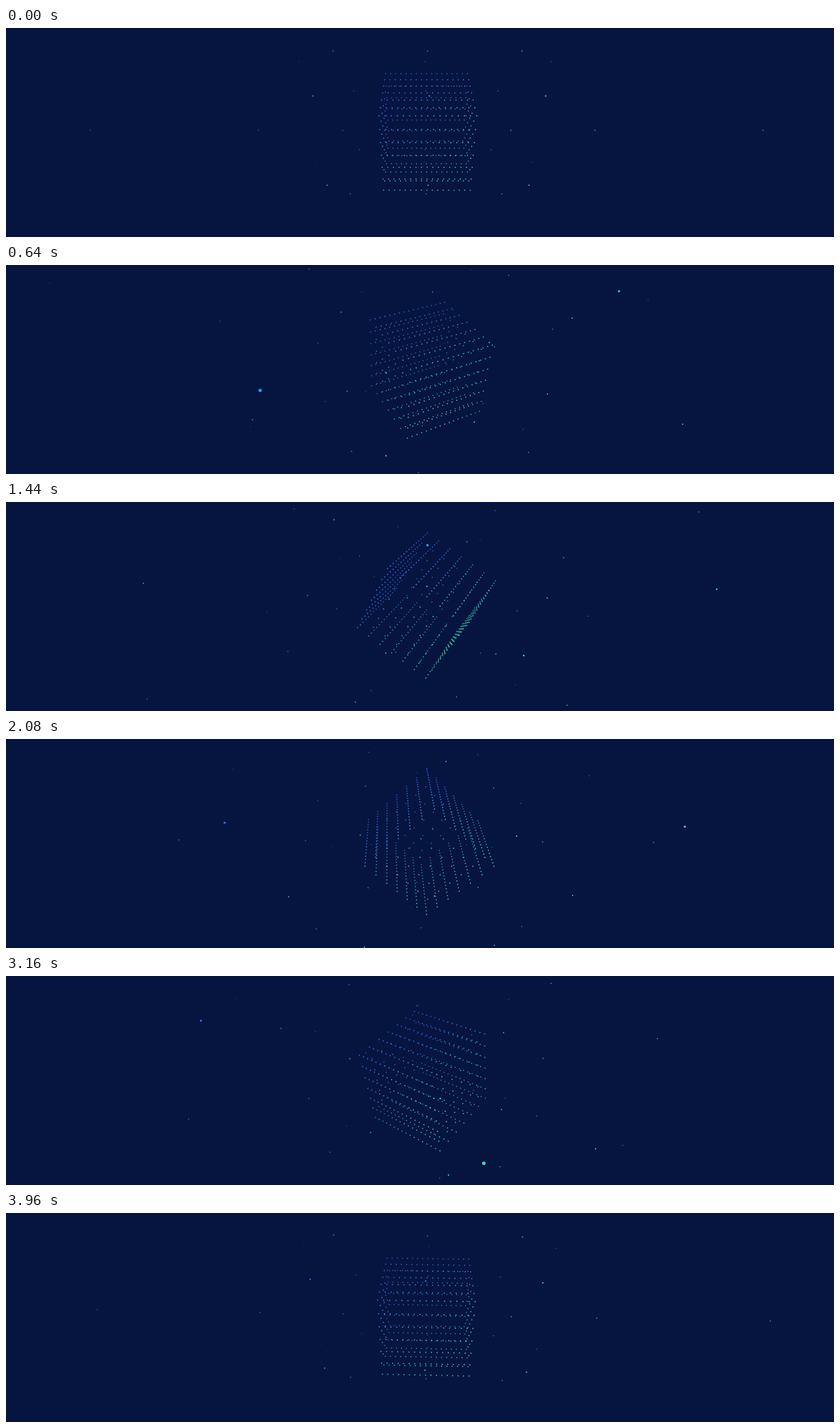
These frames come from a looping animation (1280x323 px, 4000 ms). An HTML page with a canvas:

```html
<!DOCTYPE html>
<html lang="en">
<head>
<meta charset="utf-8">
<title>Rotating point cube</title>
<style>
  html, body { margin: 0; width: 100%; height: 100%; overflow: hidden; background: #061440; }
  canvas { display: block; width: 1280px; height: 323px; }
</style>
</head>
<body>
<canvas id="stage" width="1280" height="323"></canvas>
<script>
const ctx = document.getElementById('stage').getContext('2d');
const W = 1280, H = 323;
const LOOP = 4000, STEP = 40;
const FOCAL = 650, CAMERA = 5, NEAR = 0.5;
const OFFSET = { x: 0.08, y: 0.027 };
const TILT = 33.3 * Math.PI / 180;
const DOT = 4.2;
const BLUE = [45, 120, 255], GREEN = [52, 240, 165];

// Surface points of a box centred on the origin, with nx, ny, nz segments.
function box(size, nx, ny, nz) {
  const points = [];
  const edge = (i, n) => i === 0 || i === n;
  for (let i = 0; i <= nx; i++)
    for (let j = 0; j <= ny; j++)
      for (let k = 0; k <= nz; k++)
        if (edge(i, nx) || edge(j, ny) || edge(k, nz))
          points.push([i / nx - 0.5, j / ny - 0.5, k / nz - 0.5].map(c => c * size));
  return points;
}

const points = [
  ...box(1, 16, 6, 6),
  ...[2, 4, 8].flatMap(size => box(size, 2, 2, 2))
];

const clamp = (v, lo, hi) => Math.min(hi, Math.max(lo, v));
const smooth = p => p * p * (3 - 2 * p);
const turn = (a, b, sin, cos) => [a * cos - b * sin, a * sin + b * cos];

function tint(x, y) {
  const m = clamp(0.5 + (0.6 * x - y) / 1.2, 0, 1);
  return BLUE.map((c, i) => Math.round(c + (GREEN[i] - c) * m)).join(',');
}

function draw(time) {
  const p = time / LOOP;
  const yaw = Math.PI * p;
  const roll = Math.PI / 2 * smooth(p);
  const [sr, cr, sy, cy, st, ct] =
    [roll, yaw, TILT].flatMap(a => [Math.sin(a), Math.cos(a)]);

  ctx.fillStyle = '#061440';
  ctx.fillRect(0, 0, W, H);

  for (const point of points) {
    let [x, y, z] = point;
    [y, z] = turn(y, z, sr, cr);
    [z, x] = turn(z, x, sy, cy);
    [y, z] = turn(y, z, st, ct);

    const depth = CAMERA - z;
    if (depth < NEAR) continue;
    const k = FOCAL / depth;
    const px = W / 2 + (x + OFFSET.x) * k;
    const py = H / 2 - (y + OFFSET.y) * k;
    if (px < -9 || px > W + 9 || py < -9 || py > H + 9) continue;

    const alpha = clamp(1.35 - Math.hypot(x, y, depth) / 12, 0.35, 1);
    ctx.fillStyle = `rgba(${tint(x, y)},${alpha})`;
    ctx.beginPath();
    ctx.arc(px, py, DOT / depth, 0, Math.PI * 2);
    ctx.fill();
  }
}

const start = performance.now();
function tick() {
  const time = (performance.now() - start) % LOOP;
  draw(Math.floor(time / STEP) * STEP);
  requestAnimationFrame(tick);
}
tick();
</script>
</body>
</html>
```
